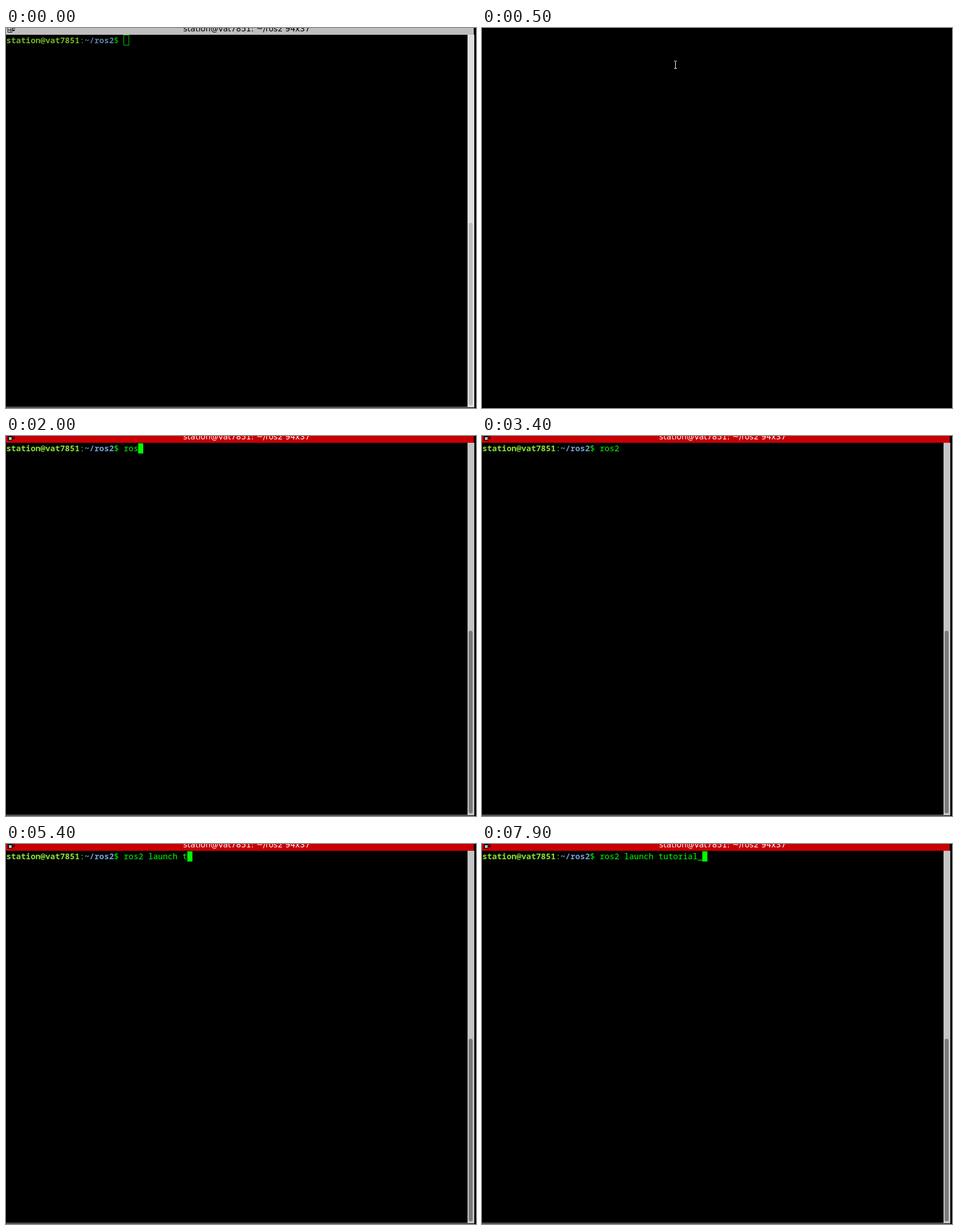
These frames come from a looping animation (832 by 673 pixels, 8000 ms). An HTML page with a canvas:

```html
<!DOCTYPE html>
<html lang="en">
<head>
<meta charset="utf-8">
<title>Terminal</title>
<style>
  html, body { margin: 0; width: 100%; height: 100%; overflow: hidden; background: #000; }
  canvas { display: block; }
</style>
</head>
<body>
<canvas id="stage" width="832" height="673"></canvas>
<script>
const ctx = document.getElementById('stage').getContext('2d');
const LOOP = 8000;
const CELL = 8.667, LEFT = 0.4, BASELINE = 27;
const USER = 'station@vat7851', PATH = '~/ros2';
const COMMAND = 'ros2 launch tutorial_';

// [time in ms, characters typed so far]
const typing = [[0, 0], [1700, 1], [1800, 2], [2000, 3], [2400, 5], [4100, 6], [4400, 8],
  [4600, 9], [4800, 11], [5400, 13], [5500, 14], [6100, 16], [6400, 18], [7000, 19],
  [7400, 20], [7900, 21]];
// [time in ms, x, y] of the mouse pointer
const pointer = [[100, 369, 7], [200, 350, 45], [300, 342, 65]];
const cursorOff = [[1400, 1700], [3400, 3900]];

const focused = {
  title: '#c80003', titleText: '#fff', user: '#8ae234', path: '#729fcf', text: '#00ff00',
  trough: '#c4c4c4', thumb: '#7b7b7b', icon: '#c0bebf'
};
const unfocused = {
  title: '#c0bebf', titleText: '#000', user: '#6eb52a', path: '#5b7fa6', text: '#00cc00',
  trough: '#e1dfde', thumb: '#c1bfbe', icon: '#e4e2e3'
};

const latest = (steps, t) => steps.filter(step => step[0] <= t).pop();

function rect(color, x, y, w, h) {
  ctx.fillStyle = color;
  ctx.fillRect(x, y, w, h);
}

function write(text, column, color, weight = '') {
  ctx.font = `${weight} 14.44px "Noto Sans Mono", monospace`;
  ctx.textAlign = 'left';
  ctx.fillStyle = color;
  ctx.fillText(text, LEFT + column * CELL, BASELINE);
}

function drawTitle(theme) {
  rect(theme.title, 0, 0, 828, 12);
  ctx.font = '14px "DejaVu Sans", sans-serif';
  ctx.textAlign = 'center';
  ctx.fillStyle = theme.titleText;
  ctx.fillText(`${USER}: ${PATH} 94x37`, 426, 6);

  rect('#000', 3, 0, 8, 8);
  rect(theme.icon, 5, 2, 5, 5);
  rect('#000', 11, 0, 5, 1);
  rect('#000', 11, 3, 5, 1);
  rect('#000', 12, 4, 3, 1);
  rect('#000', 13, 5, 1, 1);
  if (theme === unfocused) {
    rect(theme.icon, 4, 0, 3, 3);
    rect(theme.icon, 8, 0, 2, 3);
    rect(theme.icon, 4, 4, 3, 3);
    rect(theme.icon, 8, 4, 2, 3);
    rect('#000', 7, 0, 1, 7);
    rect('#000', 4, 3, 6, 1);
    rect('#b5b3b4', 23, 0, 1, 12);
  }
}

function drawScrollbar(theme) {
  rect(theme.trough, 817, 12, 12, 659);
  ctx.fillStyle = theme.thumb;
  ctx.beginPath();
  ctx.roundRect(819, 345, 7, 323, 3);
  ctx.fill();
  rect('#b4b2b3', 0, 671, 829, 1);
}

function drawPrompt(theme, t) {
  const typed = latest(typing, t)[1];
  write(USER, 0, theme.user, 'bold');
  write(':', 15, theme.text);
  write(PATH, 16, theme.path, 'bold');
  write('$', 22, theme.text);
  write(COMMAND.slice(0, typed), 24, theme.text);

  const x = Math.round(LEFT + (24 + typed) * CELL - 0.3);
  if (theme === unfocused) {
    ctx.strokeStyle = theme.text;
    ctx.strokeRect(x + 0.5, 12.5, 9, 18);
  } else if (!cursorOff.some(([from, to]) => t >= from && t < to)) {
    rect(theme.text, x, 13, 9, 18);
  }
}

function drawPointer([, x, y]) {
  rect('#fff', x, y - 6, 1, 13);
  for (const end of [y - 7, y + 6]) {
    rect('#fff', x - 2, end, 2, 1);
    rect('#fff', x + 1, end, 2, 1);
  }
}

function draw(now) {
  const t = now % LOOP;
  rect('#000', 0, 0, 832, 673);
  if (t < 500 || t >= 800) {
    const theme = t < 500 ? unfocused : focused;
    drawTitle(theme);
    drawScrollbar(theme);
    drawPrompt(theme, t);
  }
  if (t >= 100 && t < 1700) drawPointer(latest(pointer, t));
  requestAnimationFrame(draw);
}
requestAnimationFrame(draw);
</script>
</body>
</html>
```
